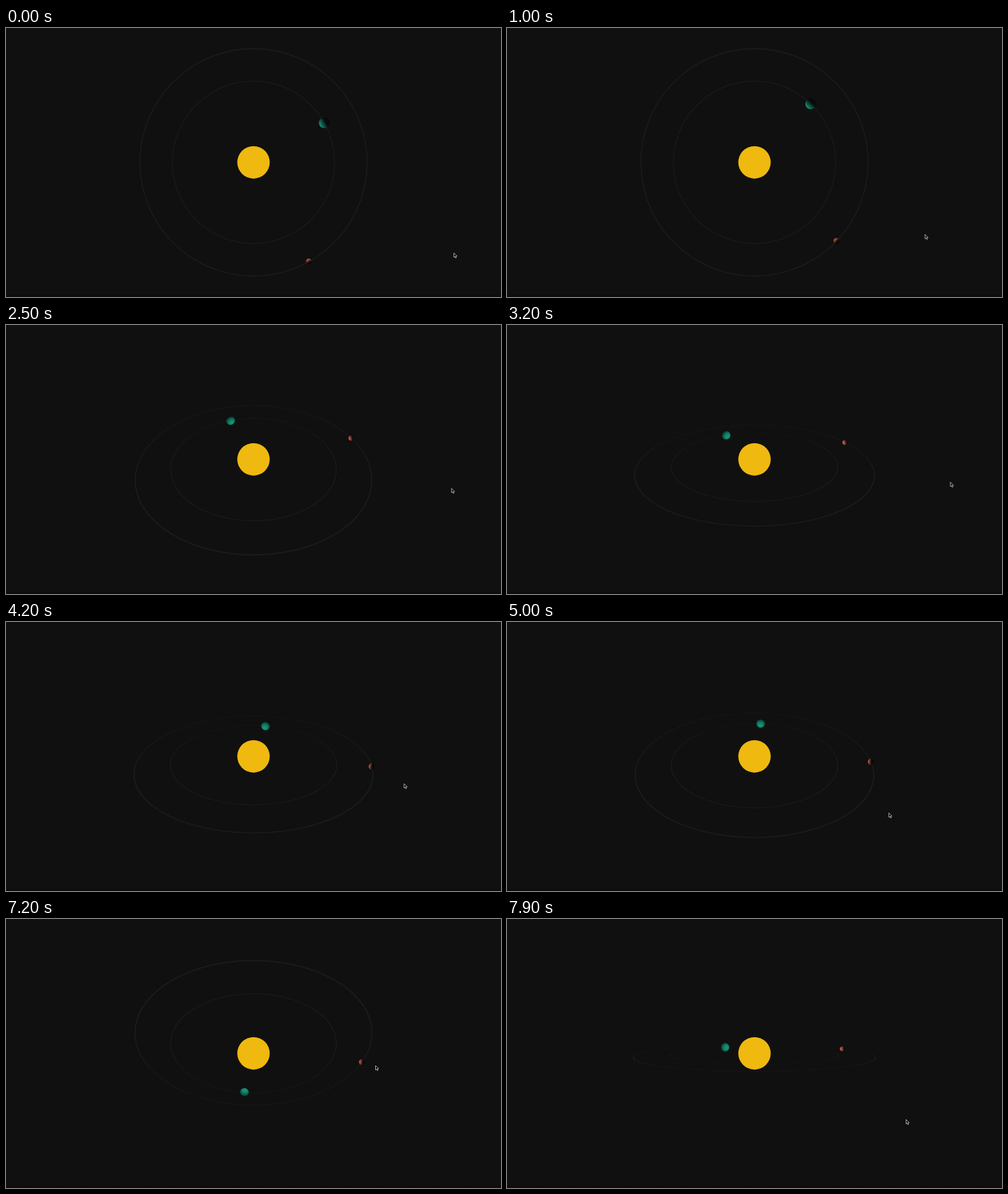
An HTML page with a canvas that plays this animation: 720 by 391 pixels, repeating every 8000 ms.

```html
<!DOCTYPE html>
<html lang="en">
<head>
<meta charset="utf-8">
<title>Orbits</title>
<style>
  html, body { margin: 0; width: 100%; height: 100%; overflow: hidden; background: #101010; }
  canvas { display: block; width: 100vw; height: 100vh; }
</style>
</head>
<body>
<canvas id="stage" width="720" height="391"></canvas>
<script>
const ctx = document.getElementById('stage').getContext('2d');
const W = 720, H = 391, CX = 360, CY = 195.3;
const LOOP = 8000, STEP = 100;
const FOCAL = 472, DIST = 20, RAD = Math.PI / 180;
const START = -60.8, SPEED = 17; // degrees, degrees per second
const WRAP = 0.3;                // light reaching past the terminator

const planets = [
  { orbit: 5, line: 0.045, size: 0.33, lead: 90, color: [20, 150, 120] },
  { orbit: 7, line: 0.06, size: 0.18, lead: 0, color: [212, 98, 75] }
];

// Dragging the view: [ms, pointer x, pointer y, camera turn, camera tilt]
const drag = [
  [0, 651.5, 327, 0, 90],
  [100, 610, 303, 0, 90],
  [1000, 608, 300, 0, 90],
  [1400, 634, 295, 12, 88],
  [1800, 651.5, 270, 36.5, 77.4],
  [2300, 649, 242, 39, 44],
  [3200, 645, 228.5, 31.5, 23.5],
  [3500, 644, 229, 31.5, 23.5],
  [4200, 579, 235, -21, 27.7],
  [5300, 549, 286, -33, 30],
  [5800, 540, 248, -45.3, 2.5],
  [7000, 537, 209, -53, -38.5],
  [7200, 537.5, 213, -53.8, -35.8],
  [7700, 545, 254, -52.6, -6],
  [7900, 580.5, 291.5, -47, 5.9]
];

// Monotone cubic interpolation of column c
function sample(keys, t, c) {
  const last = keys.length - 1;
  if (t >= keys[last][0]) return keys[last][c];
  let i = 0;
  while (keys[i + 1][0] <= t) i++;
  const slope = k => (keys[k + 1][c] - keys[k][c]) / (keys[k + 1][0] - keys[k][0]);
  const tangent = k => {
    if (k === 0) return slope(0);
    if (k === last) return slope(last - 1);
    const a = slope(k - 1), b = slope(k);
    return a * b > 0 ? 2 * a * b / (a + b) : 0;
  };
  const span = keys[i + 1][0] - keys[i][0], u = (t - keys[i][0]) / span;
  const u2 = u * u, u3 = u2 * u;
  return keys[i][c] * (2 * u3 - 3 * u2 + 1) + keys[i + 1][c] * (3 * u2 - 2 * u3)
    + span * (tangent(i) * (u3 - 2 * u2 + u) + tangent(i + 1) * (u3 - u2));
}

function project(r, angle, tilt) {
  const x = r * Math.cos(angle), far = r * Math.sin(angle);
  const y = far * Math.sin(tilt), z = far * Math.cos(tilt);
  const scale = FOCAL / (DIST + z);
  return { x, y, z, scale, px: CX + x * scale, py: CY - y * scale };
}

function loopPath(r, tilt) {
  for (let a = 0; a < 360; a += 2) {
    const p = project(r, a * RAD, tilt);
    a ? ctx.lineTo(p.px, p.py) : ctx.moveTo(p.px, p.py);
  }
  ctx.closePath();
}

// A flat band, so it thins out when seen from the side
function drawRing({ orbit, line }, tilt) {
  ctx.beginPath();
  loopPath(orbit + line / 2, tilt);
  loopPath(orbit - line / 2, tilt);
  ctx.fillStyle = '#1c1c1c';
  ctx.fill('evenodd');
}

function drawSun() {
  ctx.beginPath();
  ctx.arc(CX, CY, 23.6, 0, 2 * Math.PI);
  ctx.fillStyle = '#efb90f';
  ctx.fill();
}

// Sphere lit from the sun, shaded pixel by pixel
function drawPlanet({ size, orbit, color }, p) {
  const r = size * p.scale;
  for (let y = Math.floor(p.py - r); y <= p.py + r; y++) {
    for (let x = Math.floor(p.px - r); x <= p.px + r; x++) {
      const dx = (x + 0.5 - p.px) / r, dy = (p.py - y - 0.5) / r;
      const d = Math.hypot(dx, dy);
      const cover = Math.min(1, (1 - d) * r + 0.5);
      if (cover <= 0) continue;
      const nz = Math.sqrt(Math.max(0, 1 - d * d));
      const dot = (p.z * nz - p.x * dx - p.y * dy) / orbit;
      const light = Math.max(0, (dot + WRAP) / (1 + WRAP));
      const rgb = color.map(v => Math.round(9 + (v - 9) * light));
      ctx.fillStyle = `rgba(${rgb},${cover})`;
      ctx.fillRect(x, y, 1, 1);
    }
  }
}

const arrow = new Path2D('M0 0V6.3L1.5 5L2.5 7.3L3.5 6.9L2.6 4.7L4.5 4.6Z');
function drawPointer(x, y) {
  ctx.save();
  ctx.translate(x, y);
  ctx.fillStyle = '#000';
  ctx.fill(arrow);
  ctx.lineWidth = 0.75;
  ctx.strokeStyle = '#d4d4d4';
  ctx.stroke(arrow);
  ctx.restore();
}

const backdrop = ctx.createLinearGradient(0, H - 5, 0, H);
backdrop.addColorStop(0, '#101010');
backdrop.addColorStop(1, '#0b0b0b');

function draw(ms) {
  const t = Math.floor((ms % LOOP) / STEP) * STEP;
  const [x, y, turn, tiltDeg] = [1, 2, 3, 4].map(c => sample(drag, t, c));
  const tilt = tiltDeg * RAD;
  const spin = START + SPEED * t / 1000 + turn;

  ctx.fillStyle = backdrop;
  ctx.fillRect(0, 0, W, H);
  planets.forEach(b => drawRing(b, tilt));

  const bodies = planets.map(b => {
    const p = project(b.orbit, (spin + b.lead) * RAD, tilt);
    return { z: p.z, paint: () => drawPlanet(b, p) };
  });
  bodies.push({ z: 0, paint: drawSun });
  bodies.sort((a, b) => b.z - a.z).forEach(b => b.paint());

  drawPointer(x, y);
}

const start = performance.now();
function tick() {
  draw(performance.now() - start);
  requestAnimationFrame(tick);
}
tick();
</script>
</body>
</html>
```
